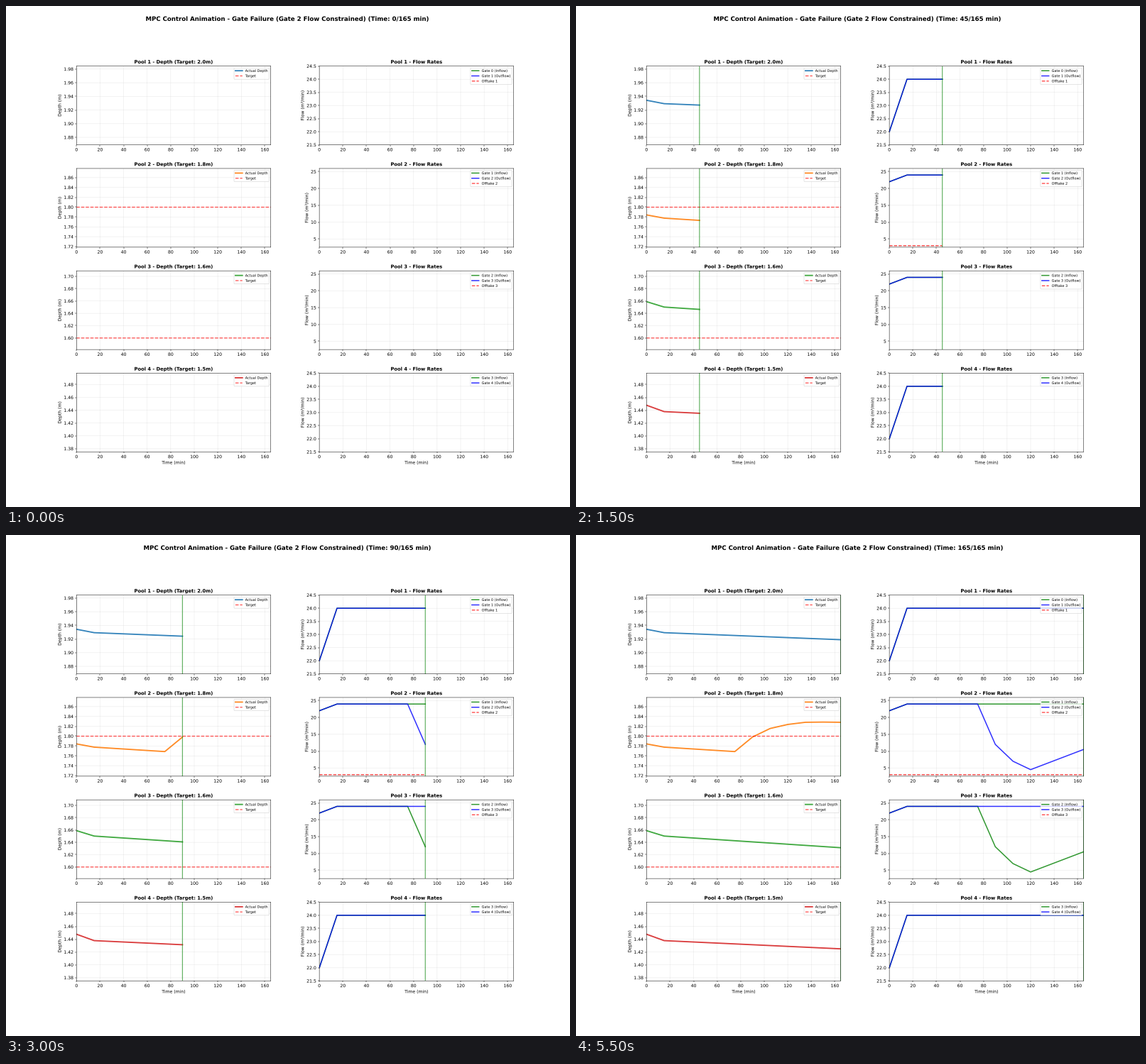
Animation, 794 px wide and 706 px high, one loop 6000 ms. Source, as a matplotlib script:

```python
import numpy as np
import matplotlib.pyplot as plt
from matplotlib import patheffects
from matplotlib.animation import FuncAnimation

WIDTH, HEIGHT, DPI = 794, 706, 44.125
STEP, END = 15, 165

# Path-drawn text and unsnapped lines keep sub-pixel positions at this low dpi.
plt.rcParams.update({
    "font.family": "DejaVu Sans",
    "text.hinting": "none",
    "path.snap": False,
    "path.effects": [patheffects.Normal()],
})

time = np.arange(0, END + 1, STEP)


def settle(start, knee, end):
    """Quick drop over the first step, then a steady decline."""
    return np.interp(time, [0, STEP, END], [start, knee, end])


depths = [
    settle(1.9343, 1.9293, 1.9190),
    np.interp(time, [0, 15, 75, 90, 105, 120, 135, 150, 165],
              [1.7843, 1.7777, 1.7687, 1.7982, 1.8156, 1.8238, 1.8282, 1.8286, 1.8282]),
    settle(1.6590, 1.6502, 1.6313),
    settle(1.4478, 1.4378, 1.4250),
]
targets = [2.0, 1.8, 1.6, 1.5]
colors = ["tab:blue", "tab:orange", "tab:green", "tab:red"]

normal_flow = np.interp(time, [0, STEP], [22, 24])
failed_flow = np.interp(time, [0, 15, 75, 90, 105, 120, 165],
                        [22, 24, 24, 12, 7, 4.5, 10.5])
gates = [normal_flow, normal_flow, failed_flow, normal_flow, normal_flow]
offtakes = [0, 3, 0]

fig, axes = plt.subplots(
    4, 2, figsize=((WIDTH + 1e-6) / DPI, (HEIGHT + 1e-6) / DPI), dpi=DPI,
    gridspec_kw={"hspace": 0.3, "wspace": 0.25})
heading = fig.suptitle("", fontsize=14, fontweight="bold")

traces = []
markers = []


def add_trace(ax, values, **style):
    line, = ax.plot([], [], **style)
    traces.append((line, values))


def finish(ax, title, ylabel, limits):
    ax.set_title(title, fontsize=11, fontweight="bold")
    ax.set_ylabel(ylabel)
    ax.set_xlim(0, END)
    ax.set_ylim(*limits)
    ax.grid(True, alpha=0.3)
    ax.legend(loc="upper right", fontsize=8)
    markers.append(ax.axvline(0, color="green", lw=2, alpha=0.6, visible=False))


for i, (depth_ax, flow_ax) in enumerate(axes):
    pool, depth = i + 1, depths[i]
    add_trace(depth_ax, depth, color=colors[i], lw=3, alpha=0.9, label="Actual Depth")
    depth_ax.axhline(targets[i], color="red", ls="--", lw=2, alpha=0.7, label="Target")
    finish(depth_ax, f"Pool {pool} - Depth (Target: {targets[i]}m)", "Depth (m)",
           (depth.min() - 0.05, depth.max() + 0.05))

    inflow, outflow = gates[i], gates[i + 1]
    add_trace(flow_ax, inflow, color="green", lw=2.5, alpha=0.8, label=f"Gate {i} (Inflow)")
    add_trace(flow_ax, outflow, color="blue", lw=2.5, alpha=0.8,
              label=f"Gate {pool} (Outflow)")
    if i < len(offtakes):
        add_trace(flow_ax, np.full(len(time), offtakes[i]), color="red", ls="--", lw=2,
                  alpha=0.8, label=f"Offtake {pool}")
    low, high = min(inflow.min(), outflow.min()), max(inflow.max(), outflow.max())
    pad = max(0.5, 0.1 * (high - low))
    finish(flow_ax, f"Pool {pool} - Flow Rates", "Flow (m³/min)", (low - pad, high + pad))

for ax in axes[-1]:
    ax.set_xlabel("Time (min)")


def update(frame):
    now = time[frame]
    for line, values in traces:
        line.set_data(time[:frame + 1], values[:frame + 1])
    for marker in markers:
        marker.set_xdata([now, now])
        marker.set_visible(frame > 0)
    heading.set_text("MPC Control Animation - Gate Failure (Gate 2 Flow Constrained) "
                     f"(Time: {now}/{END} min)")
    return [line for line, _ in traces] + markers + [heading]


animation = FuncAnimation(fig, update, frames=len(time), interval=500,
                          repeat=True, repeat_delay=0, blit=False)
plt.show()
```
